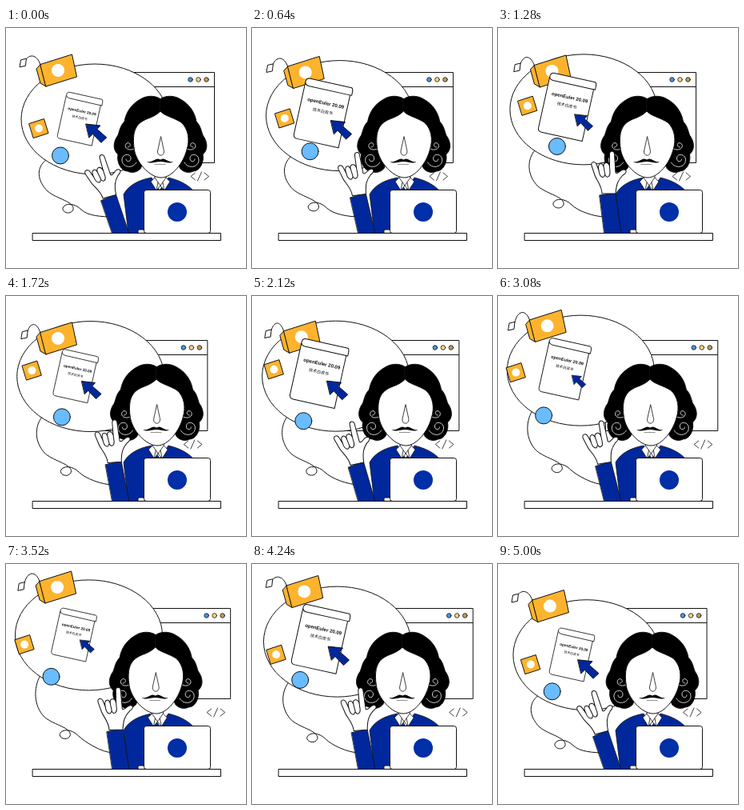
These frames come from a looping animation (300x300 px, 5040 ms). An HTML page:

```html
<!DOCTYPE html>
<html lang="zh">
<head>
<meta charset="utf-8">
<style>
  html, body { margin: 0; width: 100%; height: 100%; overflow: hidden; background: #fff; }
  svg { display: block; width: 100vw; height: 100vh; }
  .line { fill: none; stroke: #111; stroke-width: 1; stroke-linejoin: round; stroke-linecap: round; }
  .white { fill: #fff; }
  .orange { fill: #fdb32d; }
  .navy { fill: #00289c; }
  .sky { fill: #69bcff; }
  .thin { stroke-width: .8; }
  text { text-anchor: middle; fill: #111; }
</style>
</head>
<body>
<svg viewBox="0 0 300 300">
  <g id="win" class="line">
    <rect class="white" x="120.500" y="55.500" width="140" height="113"/>
    <path d="M120 73.500H260"/>
    <g class="thin">
      <circle cx="230.500" cy="64.500" r="2.800" fill="#4795dc"/>
      <circle cx="240.500" cy="64.500" r="2.800" fill="#f9d48a"/>
      <circle cx="250.500" cy="64.500" r="2.800" fill="#c09a62"/>
    </g>
    <path class="thin" d="M236.500 181L231 185.500L236.500 190M244.500 180L239.500 191M248 181L253.500 185.500L248 190"/>
  </g>

  <path id="tail" class="line"/>
  <ellipse id="bubble" class="line white" cx="111" cy="114" rx="92" ry="69"/>

  <path id="string" class="line"/>
  <path id="tag" class="line white" d="M-2.500 -4L4 -5.500L3 3.500L-4 5Z"/>
  <g id="box" class="line">
    <path class="orange" d="M-22 -7.500L-27 -2L-22 16L-15 20Z"/>
    <path class="orange" d="M-22 -7.500L17.500 -20L23.500 8L-15 20Z"/>
    <circle class="white" r="8" stroke="none"/>
  </g>
  <g id="cube" class="line">
    <path class="orange" d="M-12 -6L6.500 -12L12 6L-6.500 12Z"/>
    <circle class="white" r="5" stroke="none"/>
  </g>
  <circle id="ball" class="line sky" r="10.500"/>

  <g id="book" class="line">
    <path class="white" d="M0 6V72Q0 77 5 77H58V9"/>
    <path class="white" d="M5 9.500Q0 9 0 5Q0 0 5 0H58Q60 1 60 5V9.500Z"/>
    <g stroke="none">
      <text x="30.500" y="28" font-size="6.100" font-weight="700" font-family="Liberation Sans, Arial, sans-serif">openEuler 20.09</text>
      <text x="29" y="38.500" font-size="5.100" font-family="Noto Sans CJK SC, Noto Sans CJK, sans-serif">技术白皮书</text>
    </g>
  </g>
  <path id="cursor" class="line navy" d="M0 0L18 2L14 6.500L26 17L19 23.500L8.500 12.500L4 17Z"/>

  <g class="line">
    <path class="navy thin" d="M153 257L147 208C153 197 165 190 182 187L192 203L203 187C220 191 234 199 240 212V257Z"/>
    <g id="collar" class="thin">
      <path class="white" d="M186 176V187L181 192L188 203L193 197L198 203L205 192L200 187V176Z"/>
      <path d="M186 187L193 197L200 187M190 193L188 203H198L196 193"/>
    </g>
    <g id="hair">
      <g id="side">
        <path fill="#000" d="M193.500 89C187 84 176 84 168 89C157 95 150 105 148 117C143 122 142 128 140 134C134 142 133 152 140 158C138 168 144 179 152 179C158 182 164 180 168 176L172 168H193.500Z"/>
        <path class="thin" stroke="#fff" d="M160 151C152 155 146 148 151 144C156 142 157 149 152 149M163 168C158 177 145 174 145 165C145 157 156 156 156 163C156 168 150 168 150 164"/>
      </g>
      <use href="#side" transform="matrix(-1 0 0 1 386 0)"/>
    </g>
    <g id="face">
      <path class="white" d="M160 150C157 125 165 118 178 113C186 110 190 107 193 104C198 110 210 112 219 118C228 126 230 140 226 152C222 168 208 187 194 187C180 187 162 168 160 150Z"/>
      <path class="thin" d="M193.500 136L189.500 154C189 161 198 161 197.500 154Z"/>
      <path fill="#000" stroke="none" d="M176 167C182 168.500 185 164 190 163.500L193 164.500L196 163.500C201 164 204 168.500 209 167C205 170.500 199 167 193 167C187 167 181 170.500 176 167Z"/>
      <path class="thin" stroke="#777" d="M186 170.500H199"/>
    </g>
  </g>

  <path id="sleeve" class="line navy thin"/>
  <g id="hand" class="line">
    <path class="white" d="M130 207C130 197 123 190 121 184L117 172C116 167 121 166 123 170L126 178C124 169 130 167 132 173C132 167 138 167 139.500 173L139.500 157C140 153 145 153 145.500 157L147 181C150 184 153 176 158 177C162 178 160 182 156 184C150 190 148 195 147 207Z"/>
    <path d="M126 178C127 188 133 188 133 184M132 173L134 184C136 188 140 186 140 181L139.500 173"/>
  </g>

  <g class="line">
    <path class="white" d="M165 256V253Q166 251.500 168 252H175V256Z"/>
    <rect class="white" x="172.500" y="202.500" width="83" height="54" rx="3"/>
    <circle cx="214" cy="230" r="12" fill="#002fa7" stroke="none"/>
    <rect class="white" x="33.500" y="256.500" width="235" height="9"/>
  </g>
</svg>
<script>
const LOOP = 5040, STEP = 40, CLICK = LOOP / 3;

const $ = id => document.getElementById(id);
const set = (id, name, value) => $(id).setAttribute(name, value);
const move = (id, [x, y], more = '') => set(id, 'transform', `translate(${x} ${y}) ${more}`);
const ease = u => (1 - Math.cos(Math.PI * u)) / 2;
const ramp = (from, to, t) => ease(Math.min(1, Math.max(0, (t - from) / (to - from))));
const bump = (mid, half, t) => ease(Math.max(0, 1 - Math.abs(t - mid) / half));

// Smooth closed curve through points spread evenly over the loop
const drift = (...points) => t => {
  const n = points.length, pos = (t / LOOP + 1) % 1 * n;
  const i = Math.floor(pos), u = pos - i;
  const at = (j, k) => points[(i + j + n) % n][k];
  return [0, 1].map(k => {
    const a = at(-1, k), b = at(0, k), c = at(1, k), d = at(2, k);
    return b + u / 2 * (c - a + u * (2 * a - 5 * b + 4 * c - d + u * (3 * (b - c) + d - a)));
  });
};

const windowAt = drift([0, 0], [-13, 0], [5, 0], [21, 0]);
const bubbleAt = drift([0, 0], [-4, -12], [-7, -15], [-7, -25]);
const ballAt = drift([68, 159.5], [74, 148], [60, 158], [57, 139]);
const boxAt = drift([65, 53], [67.5, 54], [60, 48], [65, 27.5]);
const cubeAt = drift([41, 125.5], [37, 97.5], [24, 92], [24.5, 104]);

function turn(x, y, deg, cx, cy) {
  const a = deg * Math.PI / 180, c = Math.cos(a), s = Math.sin(a);
  return [cx + (x - cx) * c - (y - cy) * s, cy + (x - cx) * s + (y - cy) * c];
}

// The start follows the bubble, the loop half as much, the end is fixed
function drawTail(x, y) {
  const p = (px, py) => `${px + x / 2} ${py + y / 2} `;
  set('tail', 'd', `M${50 + x} ${165 + y}C${p(38, 174 + y / 4)}${p(38, 190)}${p(52, 204)}`
    + `C${p(64, 214)}${p(86, 217)}${p(84, 227)}C${p(81, 234)}${p(70, 231)}${p(71, 225)}`
    + `C${p(74, 218)}${p(86, 219)}${p(94, 227)}S120 236 134 236`);
}

function draw(t) {
  const [ex, ey] = bubbleAt(t), [bx, by] = boxAt(t), [lagX, lagY] = boxAt(t - 250);
  const tx = lagX - 43.5, ty = lagY - 5;
  const sway = ease(t / LOOP * 4), click = t % CLICK;

  move('win', windowAt(t));
  move('bubble', [ex, ey]);
  drawTail(ex, ey);
  move('ball', ballAt(t));
  move('cube', cubeAt(t));
  move('box', [bx, by]);
  move('tag', [tx, ty]);
  set('string', 'd', `M${tx + 4} ${ty - 5}C${tx + 7} ${by - 19} ${bx - 27} ${by - 22} ${bx - 22} ${by - 7}`);

  const bookSize = .77 + .23 * (ramp(150, 430, click) - ramp(1210, 1600, click));
  const press = bump(190, 210, click) + bump(1400, 210, click);
  move('book', [99.5 + ex, 123.5 + ey], `scale(${bookSize}) translate(-30 -57) rotate(12.5)`);
  move('cursor', [100 + ex, 120 + ey], `scale(${1 - .33 * press})`);

  move('collar', [-4 * sway, 0]);
  move('hair', [-6.5 * sway, 0]);
  move('face', [-7 * sway, 0]);

  const angle = -15.3 * (1 - sway), elbow = [148, 243];
  set('hand', 'transform', `rotate(${angle} ${elbow})`);
  set('sleeve', 'd', `M${turn(127, 209, angle, ...elbow)}L${turn(147, 206, angle, ...elbow)}L154 257H133Z`);
}

function tick() {
  draw(Math.floor(performance.now() % LOOP / STEP) * STEP);
  requestAnimationFrame(tick);
}
tick();
</script>
</body>
</html>
```
